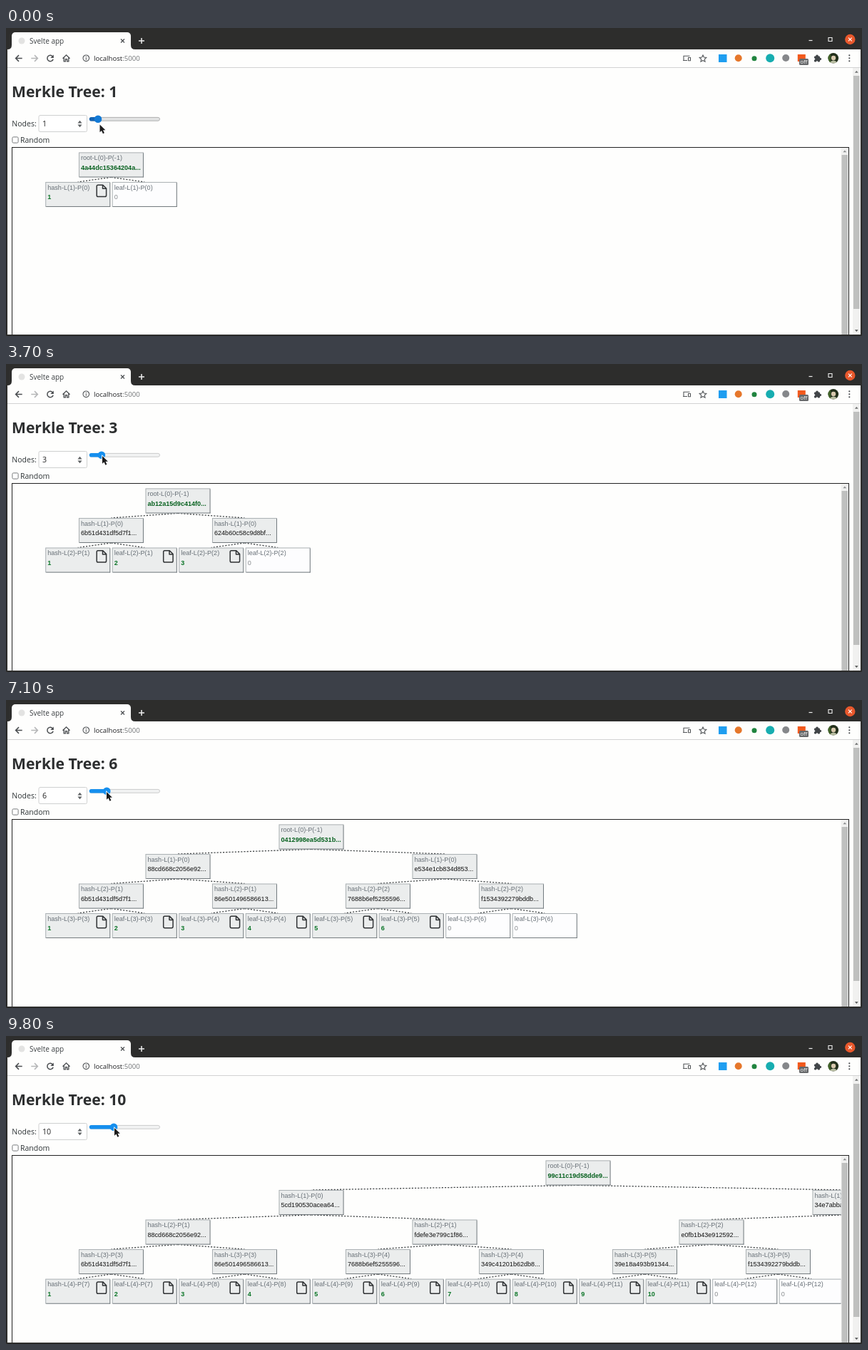
An HTML page with a canvas for the animation above (10 s loop, 1200x432 px).

```html
<!DOCTYPE html>
<html lang="en">
<head>
<meta charset="utf-8">
<title>Merkle Tree</title>
<style>
  html, body { margin: 0; width: 100%; height: 100%; overflow: hidden; background: #fefefd; }
  canvas { display: block; }
</style>
</head>
<body>
<canvas id="stage" width="1200" height="432"></canvas>
<script>
const ctx = document.getElementById('stage').getContext('2d');
const LOOP = 10000;
const UI = '"Open Sans", "Noto Sans", sans-serif';
const ARIAL = '"Liberation Sans", Arial, sans-serif';
const PAGE = '#fefefd', INK = '#2e3436';

// Step tracks: [time, ...values]
const COUNT = [[0, 1], [1300, 2], [2200, 3], [4100, 4], [5200, 5], [6300, 6],
  [7300, 7], [7600, 8], [8900, 9], [9700, 10]];
const THUMB = [[0, 1], [1300, 2], [2900, 3], [4100, 4], [5200, 5], [6000, 6],
  [7300, 7], [7600, 8], [8900, 9], [9700, 10]];
const POINTER = [[0, 131.5, 135.5], [500, 131.5, 132], [600, 131.5, 129], [1400, 132, 129],
  [2200, 133, 129], [2900, 134, 129], [3700, 135, 129], [4700, 136.5, 129], [5200, 137.5, 129],
  [6000, 140, 129], [6100, 141, 129], [7200, 142.5, 129], [7300, 143.5, 129], [7500, 145, 129],
  [7600, 146.5, 129], [7700, 147.5, 129], [8700, 148, 129], [8900, 149.5, 129],
  [9500, 150.5, 129], [9700, 152, 129]];

// Hashes by subtree height, then by the last filled leaf
const FIRST = [0, 1, 3, 5, 9];
const HASHES = [[],
  ['4a44dc15364204a', '6b51d431df5d7f1', '624b60c58c9d8bf', '86e501496586613', '1a6562590ef19d1',
    '7688b6ef5255596', 'c07d25e918b3a64', '349c41201b62db8', '8d2e9b604a17c53', '39e18a493b91344'],
  ['ab12a15d9c414f0', '88cd668c2056e92', '3bcf81da18c3a06', 'e534e1cb834d853', '94a06be27d5183c',
    'fdefe3e799c1f86', '70b5c9128e4d36a', 'e0fb1b43e912592'],
  ['98b056932d51e88', '0412998ea5d531b', 'd62f874b03a915e', '5cd190530acea64', 'b84e03d7a6192c5',
    '34e7abba90c2d16'],
  ['2e91a70c5d48b36', '99c11c19d58dde9']];
const EMPTY_HASH = 'f1534392279bddb';

function at(track, t) {
  let hit = track[0];
  for (const step of track) if (step[0] <= t) hit = step;
  return hit.slice(1);
}

function rect(x, y, w, h, color) {
  ctx.fillStyle = color;
  ctx.fillRect(x, y, w, h);
}

function round(x, y, w, h, r, fill, stroke) {
  ctx.beginPath();
  ctx.roundRect(x, y, w, h, r);
  if (fill) { ctx.fillStyle = fill; ctx.fill(); }
  if (stroke) { ctx.strokeStyle = stroke; ctx.lineWidth = 1; ctx.stroke(); }
}

function disc(x, y, r, fill) {
  ctx.beginPath();
  ctx.arc(x, y, r, 0, Math.PI * 2);
  ctx.fillStyle = fill;
  ctx.fill();
}

function text(str, x, y, font, color) {
  ctx.font = font;
  ctx.fillStyle = color;
  ctx.fillText(str, x, y);
}

function line(d, x, y, color, width = 1.3) {
  ctx.save();
  ctx.translate(x, y);
  ctx.strokeStyle = color;
  ctx.lineWidth = width;
  ctx.stroke(new Path2D(d));
  ctx.restore();
}

function solid(d, x, y, color) {
  ctx.save();
  ctx.translate(x, y);
  ctx.fillStyle = color;
  ctx.fill(new Path2D(d));
  ctx.restore();
}

function drawTabs() {
  rect(0, 0, 1200, 432, '#2d2d2c');
  rect(2, 30, 1196, 400, PAGE);
  round(8, 6, 167, 25, [5, 5, 0, 0], PAGE);
  solid('M8 24v6h-6q6 0 6-6z', 0, 0, PAGE);
  solid('M175 24v6h6q-6 0-6-6z', 0, 0, PAGE);
  disc(22, 18, 4.5, '#e3e3e2');
  text('Svelte app', 33, 21.5, '10px ' + UI, '#3c4043');
  line('M-2.5-2.5l5 5m0-5l-5 5', 163.5, 18, '#4a4d50', 1.2);
  line('M-4 0h8m-4-4v8', 190, 18, '#f0f0f0', 1.5);
  line('M-2.5 0h5', 1128, 17.5, '#eee', 1.2);
  line('M-2.5-2.5h5v5h-5z', 1155.5, 16, '#eee', 1.1);
  disc(1183.3, 16, 7.2, '#e8582c');
  line('M-2.4-2.4l4.8 4.8m0-4.8l-4.8 4.8', 1183.3, 16, '#fff', 1.2);
}

function drawToolbar() {
  rect(2, 55, 1196, 1, '#d2d3d3');
  const arrow = 'M4.7 0h-9M0-4.4l-4.4 4.4l4.4 4.4';
  line(arrow, 18, 42.5, '#4a4d50', 1.5);
  line('M-4.7 0h9M0-4.4l4.4 4.4l-4.4 4.4', 40, 42.5, '#b5b6b7', 1.5);
  line('M3.6-2.3A4.2 4.2 0 1 0 4.1 1.2', 62, 42.5, '#4a4d50', 1.5);
  solid('M4.8-4.9v4.5h-4.5z', 62, 42.5, '#4a4d50');
  line('M-5 .3l5-4.9l5 4.9M-3.3-1v5.4h2.2v-3.2h2.2v3.2h2.2v-5.4', 84.5, 42.5, '#4a4d50', 1.3);
  line('M4.3 0a4.3 4.3 0 1 1-8.6 0a4.3 4.3 0 1 1 8.6 0M0-.6v3M0-2.5v1.1', 112.3, 42.3, '#55585b', 1.1);
  const font = '9.6px ' + UI;
  text('localhost', 123, 45.7, font, '#202124');
  const w = ctx.measureText('localhost').width;
  text(':5000', 123 + w, 45.7, font, '#6d7073');

  line('M-4.5 2.6v-5.6h8.5M-5.5 3.2h6M2-.8h3v4.2h-3z', 954.5, 42.3, '#55585b', 1.1);
  line('M0-4.7l1.4 3.1l3.4.4l-2.5 2.3l.7 3.4l-3-1.7l-3 1.7l.7-3.4l-2.5-2.3l3.4-.4z', 977, 42.7, '#55585b', 1.1);
  rect(999, 37, 11.5, 11, '#1f9ef0');
  disc(1026.7, 42.3, 5, '#e6772b');
  disc(1049, 42.8, 3.5, '#20843f');
  disc(1071.2, 42.3, 6, '#17adb0');
  disc(1093.2, 42, 5, '#85878a');
  rect(1109.8, 37, 11, 10, '#f2591d');
  round(1112, 43, 13, 9, 1.5, '#66686a');
  text('off', 1113.2, 50.4, '8px ' + UI, '#fff');
  round(1133, 39.6, 8, 7.8, 1, '#414548');
  disc(1137, 39.3, 1.8, '#414548');
  disc(1141.3, 43.5, 1.8, '#414548');
  disc(1133, 43.5, 1.2, PAGE);
  disc(1137, 47.4, 1.2, PAGE);

  ctx.save();
  disc(1159.8, 42.3, 7.3, '#23301c');
  ctx.clip();
  rect(1152, 35, 4, 15, '#3f6027');
  disc(1160, 42, 3.2, '#d8c9ae');
  disc(1160, 51, 5.5, '#b8bda2');
  ctx.restore();
  for (const y of [38.3, 42.3, 46.3]) disc(1182.3, y, 1.1, '#4a4d50');
}

function drawScrollbars() {
  rect(1187, 56, 11, 374, '#f1f1f0');
  rect(1188, 67, 8.5, 327, '#bfc0bf');
  solid('M-2.4 1.3h4.8l-2.4-2.7z', 1192.3, 61.5, '#6a6c6d');
  solid('M-2.4-1.3h4.8l-2.4 2.7z', 1192.3, 424.5, '#505253');
  rect(1170.5, 168, 10.5, 262, '#f1f1f0');
  rect(1171.5, 178, 8.5, 252, '#bfc0bf');
  solid('M-2.4 1.3h4.8l-2.4-2.7z', 1175.8, 173, '#8d8f90');
}

function drawControls(n, step, t) {
  text('Merkle Tree: ' + n, 8, 97, 'bold 21.1px ' + UI, '#2d2f30');
  text('Nodes:', 8.3, 138, '10.5px ' + UI, INK);
  round(46, 122.5, 67.5, 23, 2, '#fff', '#cfd0d0');
  text(n, 51, 138, '10.6px ' + UI, '#222');
  solid('M-3 1.5h6l-3-3.7z', 103.5, 132, '#5d6062');
  solid('M-3-1.5h6l-3 3.7z', 103.5, 137, '#5d6062');

  const pressed = t >= 900;
  const x = 129 + (step - 1) * 2.45;
  const active = '#168fee', idle = '#137ad6', hover = '#1565b4';
  round(117.3, 125.4, 98.2, 4.8, 2.4, pressed ? '#f2f3f3' : '#e2e3e3', pressed ? '#cbcccc' : '#afb0b0');
  round(116.8, 125, x - 116.8, 5.6, 2.8, pressed ? active : hover);
  disc(x, 127.7, 5.3, pressed ? active : t < 500 ? idle : hover);

  round(8.9, 152.9, 8.2, 8.2, 1.5, '#fff', '#777a7c');
  text('Random', 20, 161, '10.5px ' + UI, INK);
}

function drawFile(x, y) {
  ctx.lineJoin = 'round';
  line('M2 0h6.8l4.8 4.8v9.7q0 1.8-1.8 1.8h-9.8q-1.8 0-1.8-1.8v-12.7q0-1.8 1.8-1.8zM8.5.3v4.8h4.8', x, y, '#303335', 1.5);
  ctx.lineJoin = 'miter';
}

function drawCard(x, y, label, value, color, bold, empty) {
  rect(x, y, 91, 35, '#a9afb2');
  rect(x + 1, y + 34, 90, 1, '#737a7e');
  rect(x + 90, y + 1, 1, 34, '#737a7e');
  rect(x + 1, y + 1, 89, 33, empty ? '#fdfdfe' : '#ebeded');
  text(label, x + 3, y + 10.6, '9.08px ' + ARIAL, '#687077');
  text(value, x + 3, y + 24.4, (bold ? 'bold ' : '') + '9.08px ' + ARIAL, color);
}

function hashOf(height, i, n) {
  const size = 2 ** height;
  if (i * size >= n) return EMPTY_HASH;
  return HASHES[height][Math.min(n, (i + 1) * size) - FIRST[height]];
}

function drawTree(n) {
  const depth = Math.max(1, Math.ceil(Math.log2(n)));
  const cardX = (level, i) => 55.2 + 93.5 * ((i + 0.5) * 2 ** (depth - level) - 0.5);
  const cardY = level => 174.4 + 41.55 * level;

  ctx.save();
  ctx.beginPath();
  ctx.rect(9, 168, 1161.5, 262);
  ctx.clip();
  ctx.strokeStyle = '#44484a';
  ctx.lineWidth = 1.3;
  ctx.setLineDash([2.2, 2]);
  for (let level = 1; level <= depth; level++) {
    for (let i = 0; i < 2 ** level; i++) {
      ctx.beginPath();
      ctx.moveTo(cardX(level - 1, i >> 1) + 45.5, cardY(level - 1) + 35);
      ctx.lineTo(cardX(level, i) + 45.5, cardY(level));
      ctx.stroke();
    }
  }
  ctx.setLineDash([]);

  for (let level = 0; level <= depth; level++) {
    for (let i = 0; i < 2 ** level; i++) {
      const x = cardX(level, i), y = cardY(level);
      const leaf = level === depth, root = level === 0;
      const empty = leaf && i >= n;
      const kind = root ? 'root' : leaf && i > 0 ? 'leaf' : 'hash';
      const parent = root ? -1 : 2 ** (level - 1) - 1 + (i >> 1);
      const value = leaf ? (empty ? 0 : i + 1) : hashOf(depth - level, i, n) + '...';
      const color = empty ? '#85898c' : root ? '#07611f' : leaf ? '#0d7629' : '#111';
      drawCard(x, y, `${kind}-L(${level})-P(${parent})`, value, color, root || (leaf && !empty), empty);
      if (leaf && !empty) drawFile(x + 71.8, y + 4.3);
    }
  }
  ctx.restore();

  rect(8, 167, 1174, 1, '#222');
  rect(8, 167, 1, 263, '#222');
  rect(1181, 167, 1, 263, '#222');
}

function drawPointer(x, y) {
  const d = 'M0 0v10.8l2.5-2.2l1.9 4.1l2-.9l-1.9-4h3.4z';
  line(d, x, y, '#fff', 1.6);
  solid(d, x, y, '#1c1c1c');
}

function draw(now) {
  const t = now % LOOP;
  const [n] = at(COUNT, t);
  const [step] = at(THUMB, t);
  drawTabs();
  drawToolbar();
  drawScrollbars();
  drawControls(n, step, t);
  drawTree(n);
  drawPointer(...at(POINTER, t));
}

const start = performance.now();
function frame() {
  draw(performance.now() - start);
  requestAnimationFrame(frame);
}
frame();
</script>
</body>
</html>
```
